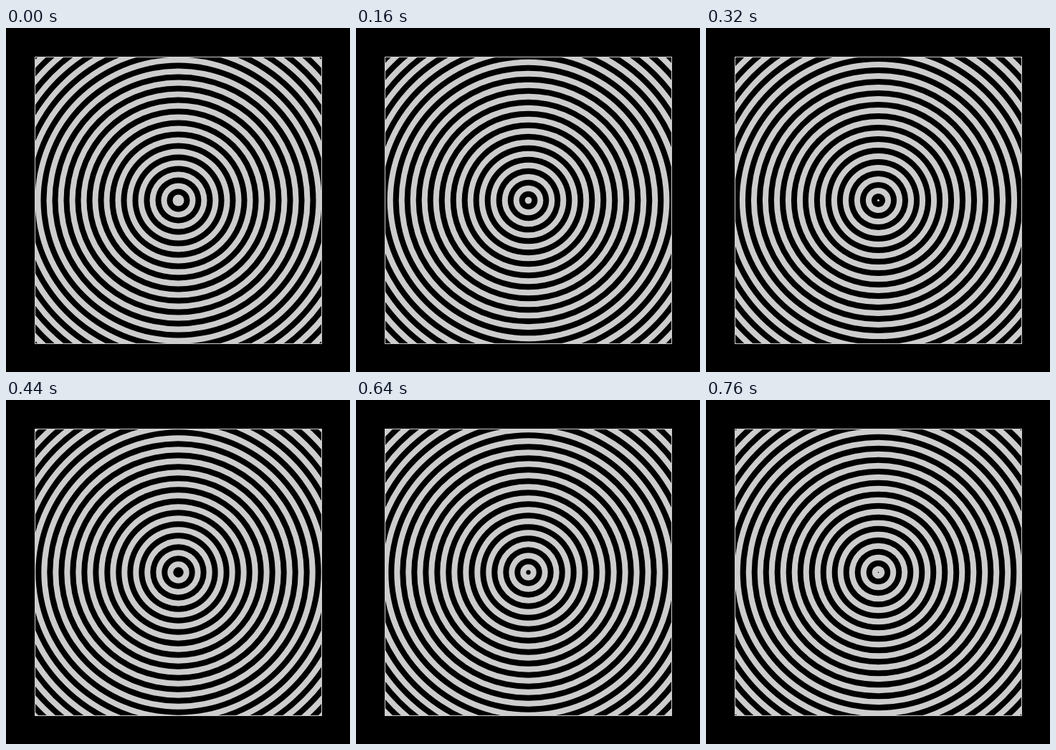
These frames come from a looping animation (480x480 px, 800 ms). An HTML page with a canvas:

```html
<!DOCTYPE html>
<html>
<head>
<meta charset="utf-8">
<style>
html, body { margin: 0; height: 100%; overflow: hidden; background: #000; }
canvas { display: block; }
</style>
</head>
<body>
<canvas id="stage" width="480" height="480"></canvas>
<script>
const ctx = document.getElementById('stage').getContext('2d');
const LOOP = 800, STEP = 40;
const LIGHT = '#cdcdcd', DARK = '#000';
const BAND = 8, CENTER = 240.5, OUTER_BAND = 38;

function disc(radius, color) {
  ctx.fillStyle = color;
  ctx.beginPath();
  ctx.arc(CENTER, CENTER, radius, 0, Math.PI * 2);
  ctx.fill();
}

function draw(time) {
  const phase = Math.floor(time % LOOP / STEP) * STEP / LOOP;
  const shrink = phase * 2 * BAND;

  ctx.fillStyle = DARK;
  ctx.fillRect(0, 0, 480, 480);

  ctx.save();
  ctx.beginPath();
  ctx.rect(40, 40, 401, 401);
  ctx.clip();
  // Alternating discs from the outside in; odd bands are light.
  for (let band = OUTER_BAND; band > 0; band--) {
    const radius = band * BAND - shrink;
    if (radius > 0) disc(radius, band % 2 ? LIGHT : DARK);
  }
  ctx.restore();

  ctx.strokeStyle = LIGHT;
  ctx.lineWidth = 1;
  ctx.strokeRect(40.5, 40.5, 400, 400);
}

function tick() {
  draw(performance.now());
  requestAnimationFrame(tick);
}
tick();
</script>
</body>
</html>
```
